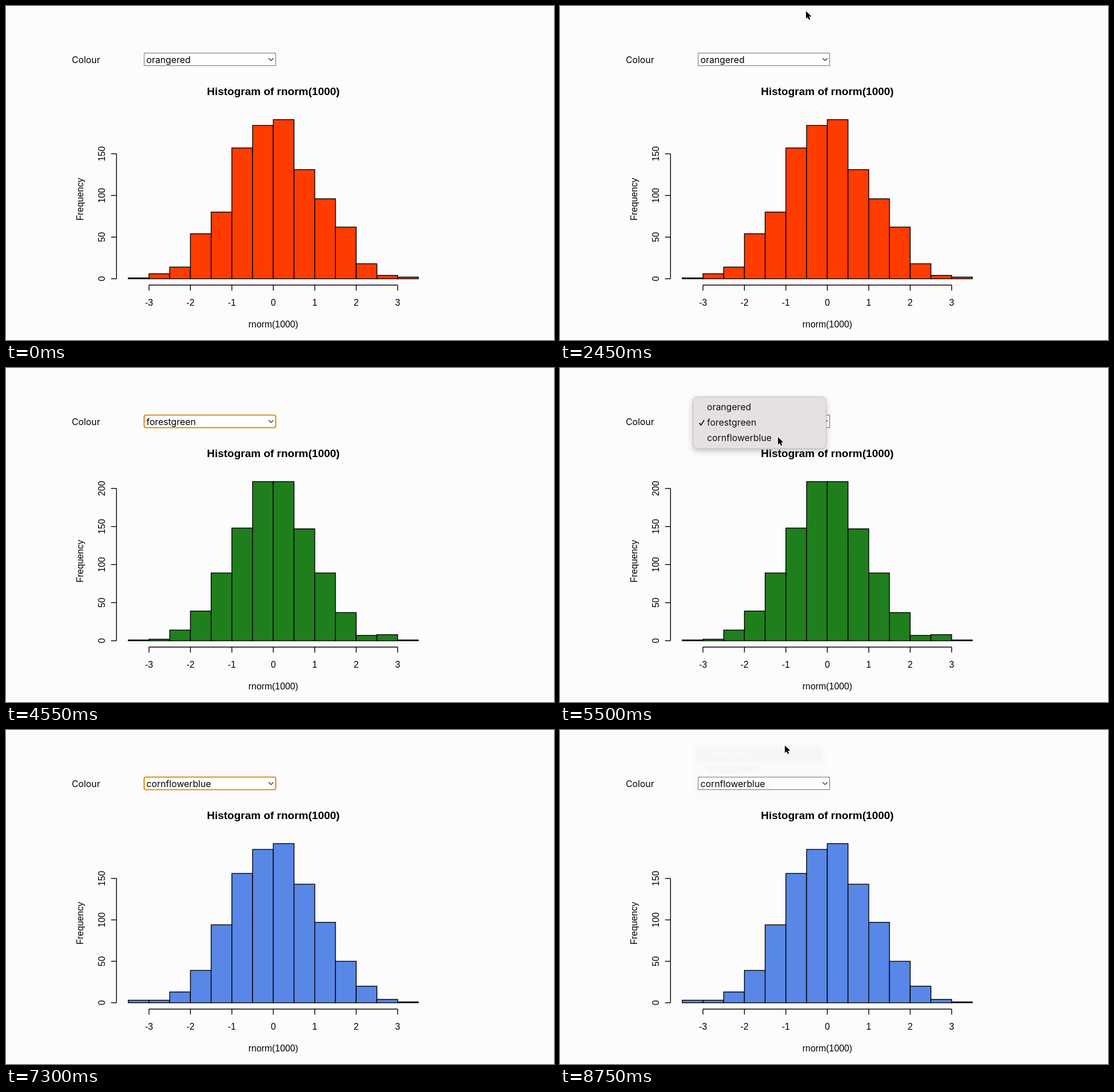
An HTML page with a canvas for the animation above (8800 ms loop, 958 by 585 pixels).

```html
<!DOCTYPE html>
<html lang="en">
<head>
<meta charset="utf-8">
<title>Histogram colour picker</title>
<style>
  html, body { margin: 0; width: 100%; height: 100%; overflow: hidden; background: #fcfcfc; }
  canvas { display: block; }
</style>
</head>
<body>
<canvas id="stage" width="958" height="585"></canvas>
<script>
const LOOP = 8800, STEP = 50;
const UI_FONT = '15.8px Inter, sans-serif';
const PLOT_FONT = '15.8px "Liberation Sans", Arial, sans-serif';
const TITLE_FONT = 'bold 19px "Liberation Sans", Arial, sans-serif';

const stage = document.getElementById('stage').getContext('2d');
const menuLayer = document.createElement('canvas');
menuLayer.width = 958;
menuLayer.height = 585;
const menuCtx = menuLayer.getContext('2d');

const options = [
  { name: 'orangered', fill: '#fe3c00',
    counts: [1, 6, 14, 54, 80, 157, 184, 191, 131, 96, 62, 18, 4, 2] },
  { name: 'forestgreen', fill: '#1f7f1d',
    counts: [1, 2, 14, 39, 89, 148, 209, 209, 147, 89, 37, 7, 8, 1] },
  { name: 'cornflowerblue', fill: '#5887e7',
    counts: [3, 3, 13, 39, 94, 156, 185, 192, 143, 97, 50, 20, 4, 1] }
];

// Each visit: the pointer comes in, opens the menu, picks an entry and leaves.
const visits = [
  { from: 0, to: 1, open: 1950, blink: 2200, fade: 2250, closed: 2450, update: 2500,
    path: [[1600, 452, 31], [1800, 440, 91], [1950, 440, 91], [2150, 400, 120],
           [2300, 402, 117], [2400, 424, 40], [2450, 430, 8]] },
  { from: 1, to: 2, open: 5100, blink: 5500, fade: 5550, closed: 5750, update: 5800,
    path: [[4700, 432, 11], [4950, 440, 91], [5100, 440, 91], [5350, 381, 120],
           [5550, 381, 120], [5700, 392, 32]] },
  { from: 2, to: 0, open: 8250, blink: 8500, fade: 8550, closed: 8758, update: LOOP,
    path: [[7950, 428, 16], [8150, 440, 91], [8250, 440, 91], [8450, 390, 45],
           [8600, 390, 45], [8750, 393, 26]] }
];

const smooth = p => p * p * (3 - 2 * p);

function pointAt(path, t) {
  if (t < path[0][0] || t > path[path.length - 1][0]) return null;
  const i = Math.max(1, path.findIndex(p => p[0] >= t));
  const [t0, x0, y0] = path[i - 1], [t1, x1, y1] = path[i];
  const k = smooth((t - t0) / (t1 - t0));
  return { x: x0 + (x1 - x0) * k, y: y0 + (y1 - y0) * k };
}

function line(ctx, points, width = 1.4, color = '#000') {
  ctx.beginPath();
  points.forEach(([x, y]) => ctx.lineTo(x, y));
  ctx.lineWidth = width;
  ctx.strokeStyle = color;
  ctx.stroke();
}

function text(ctx, str, x, y, { font = PLOT_FONT, align = 'center', color = '#000', up = false } = {}) {
  ctx.save();
  ctx.translate(x, y);
  if (up) ctx.rotate(-Math.PI / 2);
  ctx.font = font;
  ctx.textAlign = align;
  ctx.fillStyle = color;
  ctx.fillText(str, 0, 0);
  ctx.restore();
}

function roundBox(ctx, x, y, w, h, r) {
  ctx.beginPath();
  ctx.roundRect(x, y, w, h, r);
}

function drawPlot({ counts, fill }) {
  const base = 477.7, unit = 72.45, zero = 467.3;
  const max = Math.max(...counts), scale = 278.7 / max;

  text(stage, 'Histogram of rnorm(1000)', zero, 156, { font: TITLE_FONT });
  text(stage, 'rnorm(1000)', zero, 563);
  text(stage, 'Frequency', 134.5, 338.5, { up: true });

  stage.fillStyle = fill;
  stage.strokeStyle = '#000';
  stage.lineWidth = 1.4;
  counts.forEach((n, i) => {
    const x = zero + (i / 2 - 3.5) * unit;
    stage.fillRect(x, base - n * scale, unit / 2, n * scale);
    stage.strokeRect(x, base - n * scale, unit / 2, n * scale);
  });

  line(stage, [[zero - 3 * unit, 488.8], [zero + 3 * unit, 488.8]]);
  for (let v = -3; v <= 3; v++) {
    const x = zero + v * unit;
    line(stage, [[x, 488.8], [x, 498.4]]);
    text(stage, String(v), x, 525.3);
  }

  const top = Math.floor(max / 50) * 50;
  line(stage, [[193.2, base], [193.2, base - top * scale]]);
  for (let v = 0; v <= top; v += 50) {
    const y = base - v * scale;
    line(stage, [[183.6, y], [193.2, y]]);
    text(stage, String(v), 172.8, y, { up: true });
  }
}

function drawSelect(name, focused) {
  text(stage, 'Colour', 115, 99.5, { font: UI_FONT, align: 'left' });
  roundBox(stage, 241.5, 82.5, 230, 22, focused ? 3 : 0);
  stage.fillStyle = '#fff';
  stage.fill();
  stage.lineWidth = focused ? 2.2 : 1;
  stage.strokeStyle = focused ? '#df8f14' : '#6f6f6f';
  stage.stroke();
  text(stage, name, 245.5, 99.5, { font: UI_FONT, align: 'left' });
  line(stage, [[459.3, 91.5], [463.4, 95.6], [467.5, 91.5]], 1.2, '#222');
}

function drawMenu(checked, hovered, alpha) {
  const ctx = menuCtx, rowHeight = 26.7;
  const top = 50.5 - (checked - 1) * rowHeight;
  ctx.clearRect(0, 0, 958, 585);

  ctx.save();
  ctx.shadowColor = 'rgba(0,0,0,.25)';
  ctx.shadowBlur = 12;
  ctx.shadowOffsetY = 4;
  roundBox(ctx, 232.5, top, 232.5, 90.5, 7);
  ctx.fillStyle = '#e6e1e1';
  ctx.fill();
  ctx.restore();
  ctx.lineWidth = 1;
  ctx.strokeStyle = '#c4c0c0';
  ctx.stroke();

  options.forEach(({ name }, i) => {
    const mid = top + 18.5 + i * rowHeight;
    const color = i === hovered ? '#fff' : '#111';
    if (i === hovered) {
      roundBox(ctx, 238, mid - 13, 221, 26, 4);
      ctx.fillStyle = '#8b8788';
      ctx.fill();
    }
    if (i === checked) {
      line(ctx, [[243.5, mid + 0.7], [246.5, mid + 4.3], [252, mid - 4.5]], 1.7, color);
    }
    text(ctx, name, 257, mid + 5.4, { font: UI_FONT, align: 'left', color });
  });

  stage.globalAlpha = alpha;
  stage.drawImage(menuLayer, 0, 0);
  stage.globalAlpha = 1;
}

function drawPointer({ x, y }) {
  stage.save();
  stage.translate(x, y);
  stage.beginPath();
  [[0, 1], [0, 14.3], [3.1, 11.4], [5.2, 16], [7.4, 15], [5.4, 10.6], [9.5, 10.3]]
    .forEach(([px, py]) => stage.lineTo(px, py));
  stage.closePath();
  stage.lineJoin = 'round';
  stage.lineWidth = 2;
  stage.strokeStyle = '#fff';
  stage.stroke();
  stage.fillStyle = '#000';
  stage.fill();
  stage.restore();
}

function hoveredRow(visit, pointer, t) {
  if (t >= visit.blink && t < visit.fade) return -1;
  if (t >= visit.fade || !pointer) return visit.to;
  const row = Math.round((pointer.y - 95.7) / 26.7) + visit.from;
  return Math.min(2, Math.max(0, row));
}

function render(t) {
  const visit = visits.find(v => t < v.update) || visits[2];
  const pointer = pointAt(visit.path, t);
  const current = options[visit.from];

  stage.fillStyle = '#fcfcfc';
  stage.fillRect(0, 0, 958, 585);
  drawPlot(current);
  drawSelect(current.name, visit.from > 0 && t < visit.open);
  if (t >= visit.open && t < visit.closed) {
    const alpha = t < visit.fade ? 1 : (visit.closed - t) / (visit.closed - visit.fade);
    drawMenu(visit.from, hoveredRow(visit, pointer, t), alpha);
  }
  if (pointer) drawPointer(pointer);
}

const start = performance.now();
function tick() {
  const elapsed = (performance.now() - start) % LOOP;
  render(Math.floor(elapsed / STEP) * STEP);
  requestAnimationFrame(tick);
}
tick();
</script>
</body>
</html>
```
